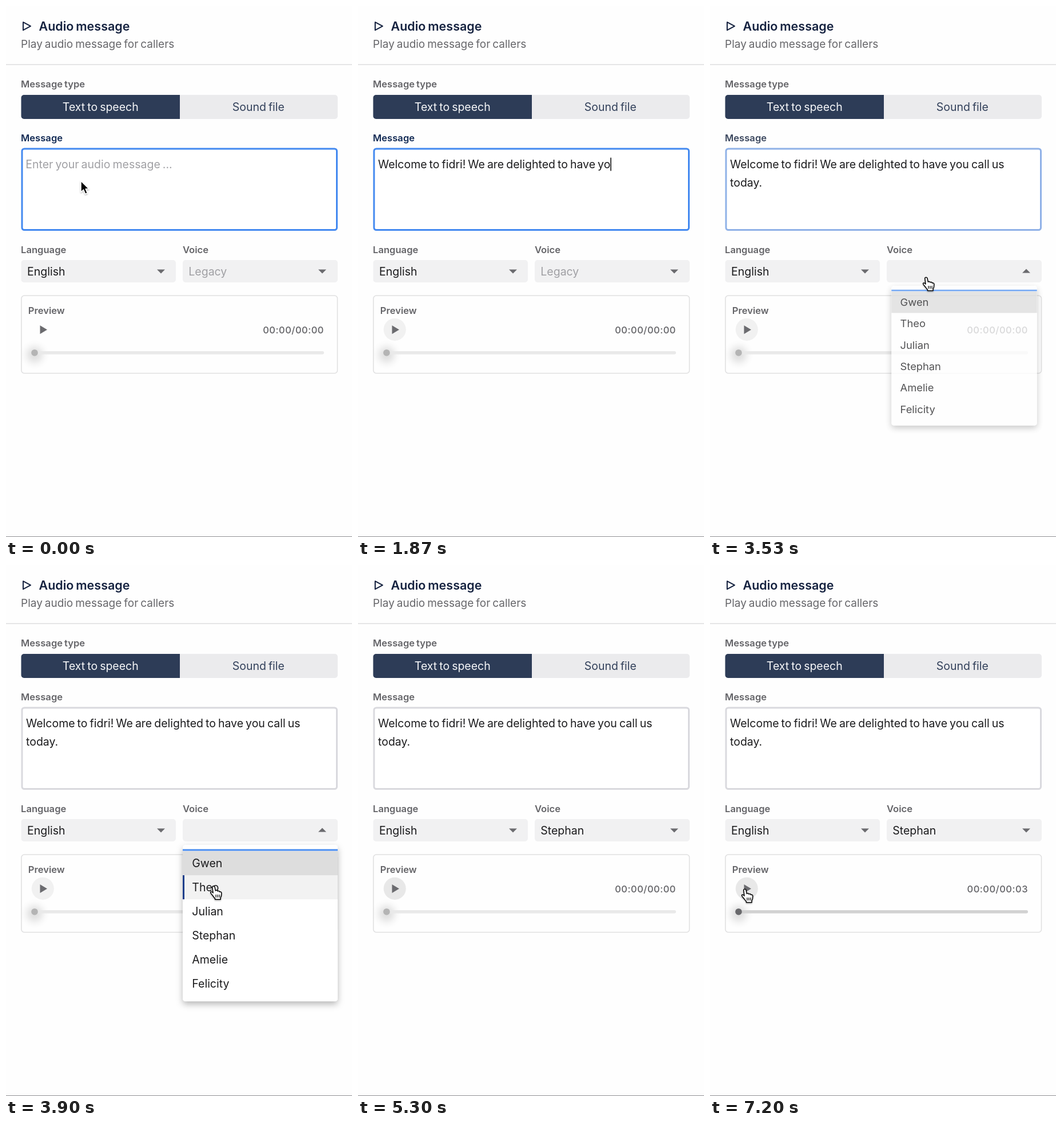
These frames come from a looping animation (605x926 px, 7.37 s). An HTML page:

```html
<!DOCTYPE html>
<html lang="en">
<head>
<meta charset="utf-8">
<title>Audio message</title>
<style>
  html, body { margin: 0; width: 100%; height: 100%; overflow: hidden; background: #fefefe; }
  svg { display: block; width: 605px; height: 926px; }
  text { font: 19.5px Inter, sans-serif; word-spacing: -.075em; fill: #1b1b1d; white-space: pre; }
  .title { font-size: 21.5px; font-weight: 600; fill: #14213f; }
  .sub { font-size: 19px; fill: #66666a; }
  .label { font-size: 16.6px; font-weight: 600; fill: #646468; }
  .mid { text-anchor: middle; }
  .time { font-size: 16.5px; font-weight: 500; letter-spacing: .5px; text-anchor: end; fill: #626266; }
  .pale { fill: #a0a0a4; }
  .icon { fill: #6b6b6f; }
</style>
</head>
<body>
<svg viewBox="0 0 605 926">
  <defs>
    <filter id="soft" x="-100%" y="-100%" width="300%" height="300%"><feGaussianBlur stdDeviation="7"/></filter>
    <filter id="drop" x="-20%" y="-20%" width="140%" height="140%">
      <feDropShadow dx="0" dy="5" stdDeviation="6" flood-opacity=".28"/>
    </filter>
    <filter id="tiny" x="-50%" y="-50%" width="200%" height="200%">
      <feDropShadow dx="0" dy="1.5" stdDeviation="1.2" flood-opacity=".3"/>
    </filter>
  </defs>

  <path d="M30 28.2V42.2L43 35.2Z" fill="none" stroke="#14213f" stroke-width="2" stroke-linejoin="round"/>
  <text class="title" x="57.5" y="43">Audio message</text>
  <text class="sub" x="26" y="73">Play audio message for callers</text>
  <rect y="101.5" width="605" height="1.5" fill="#dededf"/>

  <text class="label" x="26" y="142">Message type</text>
  <path d="M304 155H575a5 5 0 0 1 5 5V192a5 5 0 0 1-5 5H304Z" fill="#ebebed"/>
  <path d="M304 155H31.500a5 5 0 0 0-5 5V192a5 5 0 0 0 5 5H304Z" fill="#2d3c57"/>
  <text class="mid" x="165.300" y="183" style="fill:#f6f7f9">Text to speech</text>
  <text class="mid" x="441.300" y="183" style="fill:#33415b">Sound file</text>

  <text class="label" id="fieldLabel" x="26" y="235.500">Message</text>
  <rect id="field" x="28" y="249" width="550.500" height="141.500" rx="4" fill="#fff" stroke-width="3"/>
  <text class="pale" id="hint" x="34.300" y="283">Enter your audio message ...</text>
  <text id="line1" x="35" y="283"></text>
  <text id="line2" x="35" y="315"></text>
  <rect id="caret" width="1.500" height="23" fill="#000"/>

  <text class="label" x="26" y="431">Language</text>
  <text class="label" x="309" y="431">Voice</text>
  <rect x="26.500" y="443" width="270.500" height="39" rx="5" fill="#f1f1f2"/>
  <rect x="309" y="443" width="271" height="39" rx="5" fill="#f1f1f2"/>
  <text x="37" y="469.500">English</text>
  <text id="voice" x="319.300" y="469.500"></text>
  <path class="icon" d="M264 459.500H278L271 466.500Z"/>
  <path class="icon" id="voiceArrow" d="M546 459.500H560L553 466.500Z"/>

  <g id="card">
    <rect x="27" y="505" width="552.500" height="135.500" rx="5" fill="none" stroke="#dfdfe0" stroke-width="1.500"/>
    <text class="label" x="38.800" y="536.500">Preview</text>
    <circle id="halo" cx="64.300" cy="564.300" r="19.500"/>
    <path class="icon" d="M59.500 557V572L72 564.500Z"/>
    <text class="time" id="time" x="556" y="570.500"></text>
    <circle cx="50" cy="608" r="14" fill="#000" opacity=".13" filter="url(#soft)"/>
    <rect id="track" x="50" y="602" width="506" height="5.500" rx="2.700"/>
    <circle id="thumb" cx="50" cy="604.700" r="5.800"/>
  </g>
  <rect id="skeleton" x="26.500" y="504.500" width="553.500" height="136.500" rx="5" fill="#000"/>

  <g id="menu">
    <rect x="309" y="488" width="271" height="273" rx="5" fill="#fff" filter="url(#drop)"/>
    <rect x="309" y="499" width="271" height="42" fill="#dddddd"/>
    <g id="hover">
      <rect x="309" width="271" height="42" fill="#f2f2f2"/>
      <rect x="309" width="3" height="42" fill="#1c3f8c"/>
    </g>
    <rect x="309" y="495.500" width="271" height="3" fill="#4a8df0"/>
  </g>

  <g id="arrow" filter="url(#tiny)">
    <path d="M0 0V19.500L4.500 15.400L7.600 22.800L11.300 21.200L8.200 14H14Z" fill="#000" stroke="#fff" stroke-width="1.500" stroke-linejoin="round"/>
  </g>
  <g id="hand" filter="url(#tiny)">
    <path d="M-2.200 2.200C-2.200-.5 1.600-.5 2 2L3.300 8.200C4.500 6.900 6.600 7.300 7 9C8.200 7.900 10.100 8.500 10.500 10.200C12 9.400 13.700 10.400 13.800 12.200C14 16 13.400 18.200 12 20.500V23.500H2.500V21.700C.5 20-.8 17.500-2.600 15.400C-4 13.700-6 12.200-5.500 10.700C-4.800 9.200-2.700 10-1 12Z" fill="#fff" stroke="#000" stroke-width="1.500" stroke-linejoin="round"/>
    <path d="M4 15V20M7 15V20M10 15V20" stroke="#000" stroke-width="1.200"/>
  </g>
  <rect y="925" width="605" height="1" fill="#8f8f92"/>
</svg>

<script>
const LOOP = 7370;
const MESSAGE = 'Welcome to fidri! We are delighted to have you call us today.';
const VOICES = ['Gwen', 'Theo', 'Julian', 'Stephan', 'Amelie', 'Felicity'];
const OPEN = 3430, PICK = 4230, CLICK = 5270, LOAD = 5370, READY = 6770;

// [time, characters typed]
const TYPING = [[30, 1], [730, 17], [770, 18], [1500, 38], [1629, 38], [1630, 39], [1870, 45],
  [2300, 57], [2370, 58], [2450, 59], [2530, 60], [2669, 60], [2670, 61]];
// [time, x, y, easing into this point]
const linear = p => p, easeIn = p => p ** 1.6, easeOut = p => 1 - (1 - p) ** 2;
const smooth = p => p * p * (3 - 2 * p);
const POINTER = [[2700, 131, 305], [3000, 281, 470, easeIn], [3300, 378, 473, easeOut], [3800, 378, 473],
  [3900, 363, 559, easeIn], [4070, 368, 633, easeOut], [4670, 368, 633], [5100, 61, 565, smooth]];

const el = {};
document.querySelectorAll('[id]').forEach(e => el[e.id] = e);
const set = (e, attrs) => { for (const k in attrs) e.setAttribute(k, attrs[k]); };
const show = (e, on) => e.style.display = on ? '' : 'none';
const write = (e, s) => { if (e.textContent !== s) e.textContent = s; };
const ramp = (t, from, length) => Math.min(1, Math.max(0, (t - from) / length));
const mix = (a, b, p) => `rgb(${a.map((v, i) => Math.round(v + (b[i] - v) * p))})`;

VOICES.forEach((name, i) => {
  const item = document.createElementNS('http://www.w3.org/2000/svg', 'text');
  set(item, { x: 325.3, y: 527 + 41.9 * i });
  item.textContent = name;
  el.menu.append(item);
});

function along(table, t, col, ease = () => linear) {
  if (t <= table[0][0]) return table[0][col];
  const i = table.findIndex(row => row[0] > t);
  if (i < 0) return table[table.length - 1][col];
  const a = table[i - 1], b = table[i];
  return a[col] + (b[col] - a[col]) * ease(b)((t - a[0]) / (b[0] - a[0]));
}

function drawField(t) {
  const n = t < 30 ? 0 : Math.floor(along(TYPING, t, 1) + .01);
  const wrapped = n >= 60;
  write(el.line1, MESSAGE.slice(0, wrapped ? 54 : n));
  write(el.line2, wrapped ? MESSAGE.slice(55, n) : '');
  show(el.hint, n === 0);
  show(el.caret, n > 0 && t < OPEN);
  const last = wrapped ? el.line2 : el.line1;
  set(el.caret, { x: 35 + last.getComputedTextLength(), y: wrapped ? 296 : 264.5 });

  const blur = ramp(t, OPEN, 200);
  set(el.field, { stroke: mix([67, 137, 240], [217, 217, 222], blur) });
  el.fieldLabel.style.fill = mix([18, 42, 84], [100, 100, 104], blur);
}

function drawMenu(t, y) {
  const opened = t >= OPEN && t < PICK;
  write(el.voice, t < OPEN ? 'Legacy' : opened ? '' : VOICES[3]);
  el.voice.setAttribute('class', t < OPEN ? 'pale' : '');
  set(el.voiceArrow, { transform: opened ? 'rotate(180 553 462.5)' : '' });

  const grow = easeOut(ramp(t, OPEN, 200));
  const alpha = grow * (1 - ramp(t, PICK, 200));
  show(el.menu, alpha > 0);
  set(el.menu, {
    opacity: alpha,
    transform: `translate(444.5 488) scale(${.75 + .25 * grow} ${.56 + .44 * grow}) translate(-444.5 -488)`
  });
  const row = Math.floor((y - 499) / 42);
  show(el.hover, row > 0);
  set(el.hover, { transform: `translate(0 ${499 + 42 * row})` });
}

function drawCard(t) {
  const ready = t >= READY;
  const fade = ramp(t, READY, 260);
  const pulse = .7 + .3 * Math.cos(Math.PI * Math.max(0, t - LOAD - 500) / 1000);
  const loading = t >= LOAD && fade < 1;
  show(el.skeleton, loading);
  set(el.skeleton, { opacity: .1 * pulse * (1 - fade) });
  set(el.card, { opacity: t < LOAD ? 1 : fade });
  show(el.halo, t >= 30);
  set(el.halo, { fill: t < 5070 ? '#f1f1f1' : '#e8e8e8' });
  set(el.track, { fill: ready ? '#d2d2d2' : '#e9e9e9' });
  set(el.thumb, { fill: ready ? '#69696c' : '#b4b4b4' });
  write(el.time, ready ? '00:00/00:03' : '00:00/00:00');
}

function drawPointer(t, x, y) {
  const visible = t < 30 || (t >= 2730 && t < CLICK) || t >= READY;
  const overSelect = y > 443 && y < 482 && (x < 297 || x > 309);
  const overMenu = t >= OPEN && t < PICK + 200;
  const overPlay = Math.hypot(x - 64.3, y - 564.3) < 20;
  const isHand = overSelect || overMenu || overPlay;
  for (const [e, on] of [[el.arrow, !isHand], [el.hand, isHand]]) {
    show(e, visible && on);
    set(e, { transform: `translate(${x} ${y})` });
  }
}

function draw(t) {
  const ease = row => row[3] || linear;
  const x = along(POINTER, t, 1, ease), y = along(POINTER, t, 2, ease);
  drawField(t);
  drawMenu(t, y);
  drawCard(t);
  drawPointer(t, x, y);
}

const start = performance.now();
function tick() {
  draw((performance.now() - start) % LOOP);
  requestAnimationFrame(tick);
}
tick();
</script>
</body>
</html>
```
